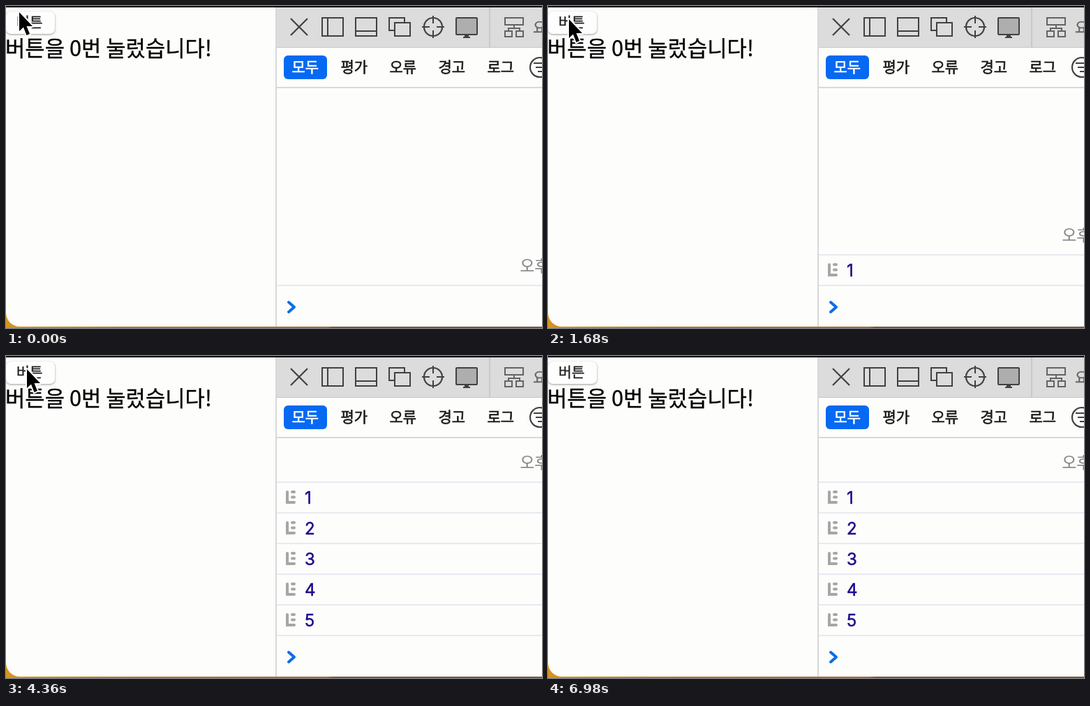
Animation of 768 by 462 pixels, one loop 7080 ms. Source, as an HTML page with a canvas:

```html
<!DOCTYPE html>
<html lang="ko">
<head>
<meta charset="utf-8">
<style>
  html, body { margin: 0; width: 100%; height: 100%; overflow: hidden; background: #fdfdfd; }
  canvas { display: block; }
</style>
</head>
<body>
<canvas id="stage" width="768" height="462"></canvas>
<script>
const ctx = document.getElementById('stage').getContext('2d');
const W = 768, H = 462, LOOP = 7080;
const HOLD = 140;
const presses = [820, 1800, 2660, 3380, 4180];
const LEAVE = 4900;
const PAPER = '#fdfdfc', INK = '#414141', MUTED = '#646464', LINE = '#e9e9f1';
const KOREAN = '"Noto Sans CJK KR", "Noto Sans CJK", sans-serif';

function fill(color, x, y, w, h) {
  ctx.fillStyle = color;
  ctx.fillRect(x, y, w, h);
}

function round(color, x, y, w, h, r) {
  ctx.fillStyle = color;
  ctx.beginPath();
  ctx.roundRect(x, y, w, h, r);
  ctx.fill();
}

// A thin outline gives a medium weight between regular and bold.
function text(str, x, y, size, color, outline = 0, font = KOREAN) {
  ctx.font = `${size}px ${font}`;
  ctx.fillStyle = ctx.strokeStyle = color;
  ctx.fillText(str, x, y);
  if (outline) {
    ctx.lineWidth = outline;
    ctx.strokeText(str, x, y);
  }
}

function line(color, width, ...paths) {
  ctx.strokeStyle = color;
  ctx.lineWidth = width;
  ctx.beginPath();
  for (const [x, y, ...rest] of paths) {
    ctx.moveTo(x, y);
    for (let i = 0; i < rest.length; i += 2) ctx.lineTo(rest[i], rest[i + 1]);
  }
  ctx.stroke();
}

function box(color, x, y, w, h) {
  ctx.strokeStyle = color;
  ctx.lineWidth = 2;
  ctx.strokeRect(x, y, w, h);
}

function ring(color, x, y, r) {
  ctx.strokeStyle = color;
  ctx.lineWidth = 2.2;
  ctx.beginPath();
  ctx.arc(x, y, r, 0, 2 * Math.PI);
  ctx.stroke();
}

function drawWindow() {
  const edge = ctx.createLinearGradient(0, 0, W, 0);
  edge.addColorStop(0, '#d8941c');
  edge.addColorStop(0.2, '#b97722');
  edge.addColorStop(0.6, '#a86c2c');
  edge.addColorStop(0.61, '#7c5638');
  edge.addColorStop(1, '#7c5638');
  fill(edge, 0, 0, W, H);
  round(PAPER, 0, 2, W, 458, [0, 0, 0, 20]);
  fill('#000', 0, 0, W, 2);
}

function drawPage(pressed) {
  ctx.save();
  ctx.shadowColor = 'rgba(0, 0, 0, 0.4)';
  ctx.shadowBlur = 3;
  ctx.shadowOffsetY = 1;
  round(pressed ? '#ededed' : '#fefefe', 0, 8, 70, 32, 7);
  ctx.restore();
  text('버튼', 15, 31, 20.5, '#202020', 0.3);
  text('버튼을 0번 눌렀습니다!', -1, 72, 30.8, '#000', 0.3);
}

function drawToolbar() {
  fill('#dcdcdc', 388, 2, 380, 57);
  fill('#c8c8c8', 388, 59, 380, 1);
  fill('#c9c9c9', 692, 2, 2, 57);

  line(INK, 2.2, [408, 18, 432, 42], [432, 18, 408, 42]);
  box(INK, 453, 17, 30, 26);
  line(INK, 2, [461, 17, 461, 43]);
  box(INK, 501, 17, 30, 26);
  line(INK, 2, [501, 36, 531, 36]);
  box(INK, 557, 24, 22, 19);
  line(INK, 2, [557, 35, 549, 35, 549, 17, 571, 17, 571, 24]);

  ring(INK, 612, 30, 13);
  line(INK, 2, [596, 30, 607, 30], [617, 30, 628, 30],
    [612, 14, 612, 25], [612, 35, 612, 46]);

  round(INK, 644, 16, 32, 26, 2);
  fill('#aeaeae', 646, 18, 28, 22);
  fill(INK, 657, 42, 6, 2);
  fill(INK, 655, 44, 10, 2);

  box(MUTED, 715, 17, 26, 10);
  box(MUTED, 715, 36, 10, 8);
  box(MUTED, 731, 36, 10, 8);
  line(MUTED, 2, [728, 27, 728, 32], [720, 36, 720, 32, 736, 32, 736, 36]);
  text('요소', 755, 38, 21, MUTED, 0.4);
}

function drawFilters() {
  round('#0669f2', 398, 71, 62, 34, 6);
  ['모두', '평가', '오류', '경고', '로그'].forEach((label, i) =>
    text(label, 409.5 + 70 * i, 94.5, 21, i ? '#1a1a1a' : '#fff', 0.6));
  ring(INK, 765, 88, 14);
  line(INK, 2.2, [756, 82, W, 82], [759, 88, W, 88], [762, 94, W, 94]);
  fill('#d9d9d9', 388, 116, 380, 2);
}

function drawLogIcon(y) {
  ctx.lineCap = 'round';
  line('#a6a6a6', 4, [403, y - 8, 403, y + 7, 413, y + 7],
    [410, y - 8, 413, y - 8], [410, y - 0.5, 413, y - 0.5]);
  ctx.lineCap = 'butt';
}

function drawConsole(count) {
  fill(LINE, 388, 400, 380, 2);
  for (let i = 1; i <= count; i++) {
    const y = 379 - 44 * (count - i);
    fill(LINE, 388, y - 23, 380, 2);
    drawLogIcon(y);
    text(i, 428, y + 9, 24, '#1c0a8c', 0.5, 'Inter, sans-serif');
  }
  text('오후', 736.5, 381 - 44 * count, 22.5, '#878787', 0.2);
  ctx.lineCap = ctx.lineJoin = 'round';
  line('#0a6de6', 4, [405, 425, 413, 432, 405, 439]);
  ctx.lineCap = 'butt';
  ctx.lineJoin = 'miter';
}

function drawCursor(t) {
  const p = Math.min(1, Math.max(0, (t - 20) / 600));
  const ease = p * p * (3 - 2 * p);
  ctx.save();
  ctx.translate(19 + 11 * ease, 9 + 10 * ease);
  const arrow = new Path2D('M0 0V27L6 21.5L10.5 33L15 31L10.5 20H19Z');
  ctx.lineJoin = 'round';
  ctx.lineWidth = 4;
  ctx.strokeStyle = '#fff';
  ctx.stroke(arrow);
  ctx.fillStyle = '#000';
  ctx.fill(arrow);
  ctx.restore();
}

function draw(now) {
  const t = now % LOOP;
  const count = presses.filter(p => t >= p + HOLD).length;
  const pressed = presses.some(p => t >= p && t < p + HOLD);
  drawWindow();
  drawPage(pressed);
  fill('#d8d8d8', 386, 2, 2, 458);
  drawToolbar();
  drawFilters();
  drawConsole(count);
  if (t < LEAVE) drawCursor(t);
}

const start = performance.now();
function tick() {
  draw(performance.now() - start);
  requestAnimationFrame(tick);
}
tick();
</script>
</body>
</html>
```
